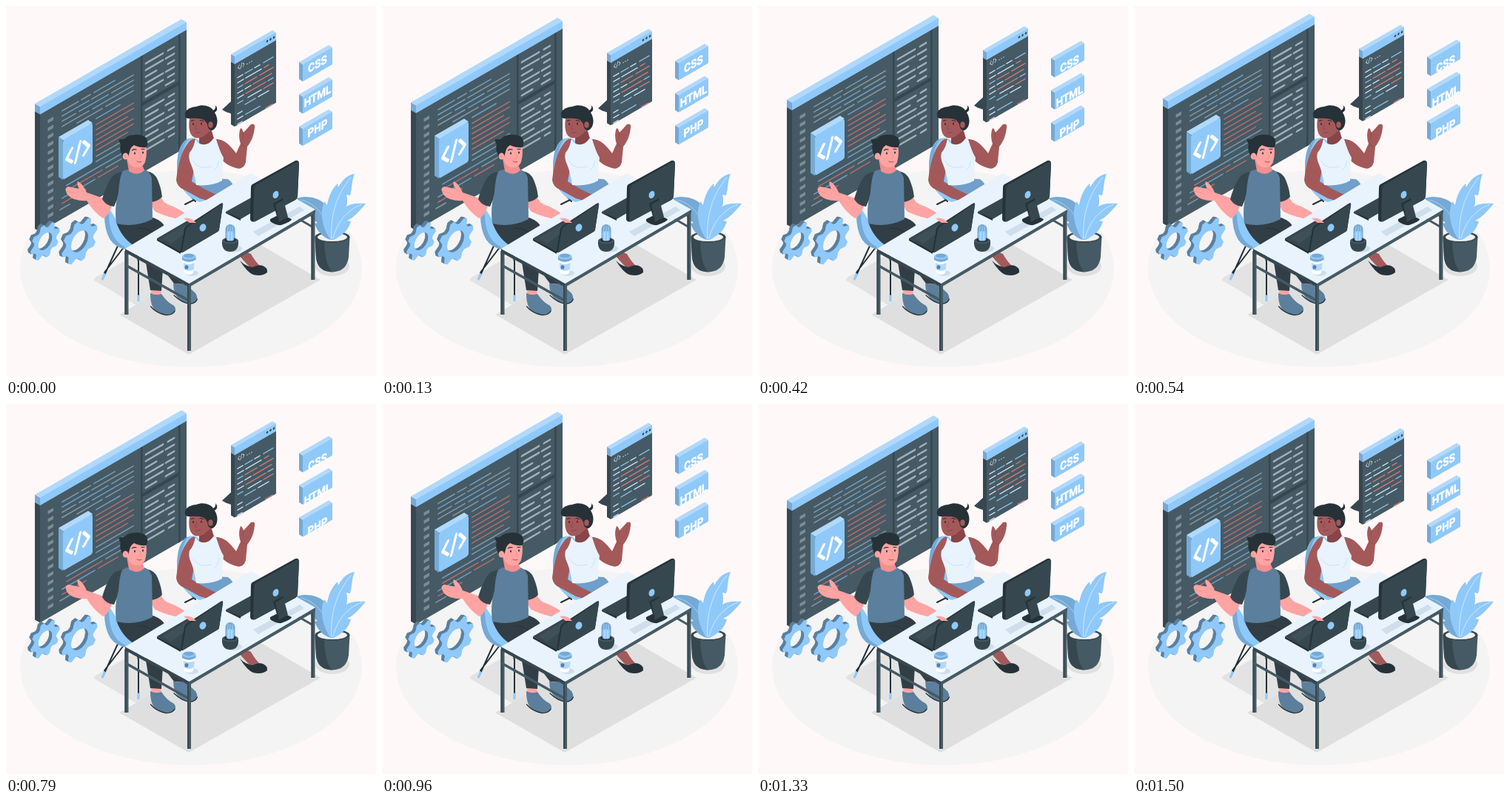
Recreate the animation shown at these times as an HTML page. Size 500 px wide and 500 px high, loop 1540 ms.

```html
<!DOCTYPE html>
<html lang="en">
<head>
<meta charset="utf-8">
<title>Developers at work</title>
<style>
html, body { margin: 0; width: 100%; height: 100%; overflow: hidden; background: #fff8f8; }
svg { display: block; width: 100%; height: 100%; }
text { font-family: Roboto, Arial, sans-serif; font-weight: 700; text-anchor: middle; fill: #fff; stroke: #fff; stroke-width: .5; stroke-linejoin: round; }
</style>
</head>
<body>
<svg id="stage" viewBox="0 0 500 500" xmlns="http://www.w3.org/2000/svg"></svg>
<script>
const BLUE = '#8fc9fa', LIGHT = '#b1d9fc', DEEP = '#76a9d4', STEEL = '#5b7f9c';
const SLATE = '#455a64', DARK = '#37474f', INK = '#263238';
const SKIN = '#ffa4a3', BLUSH = '#f28f8f', BROWN = '#a3595a', UMBER = '#874547';

const poly = (pts, fill) => `<polygon points="${pts}" fill="${fill}"/>`;
const path = (d, fill, more = '') => `<path d="${d}" fill="${fill}" ${more}/>`;
const line = (d, color, w = 1) =>
  `<path d="${d}" fill="none" stroke="${color}" stroke-width="${w}" stroke-linecap="round" stroke-linejoin="round"/>`;
const oval = (x, y, rx, ry, fill, more = '') =>
  `<ellipse cx="${x}" cy="${y}" rx="${rx}" ry="${ry}" fill="${fill}" ${more}/>`;
const rect = (x, y, w, h, fill, r = 0) =>
  `<rect x="${x}" y="${y}" width="${w}" height="${h}" rx="${r}" fill="${fill}"/>`;
// wall plane that rises to the right
const wall = (x, y, body, sx = 1) =>
  `<g transform="matrix(${sx} ${-0.577 * sx} 0 1 ${x} ${y})">${body}</g>`;
const bars = (rows, w) => rows.map(([v, a, b, c]) => line(`M${a} ${v}H${b}`, c, w)).join('');

// slab: front face at (x, y), width w, height h, depth (dx, dy)
function slab(x, y, w, h, dx, dy, front, side, top, r = 0) {
  const k = 0.577 * w;
  return poly([x, y, x - dx, y - dy, x - dx, y + h - dy, x, y + h], side) +
    poly([x, y, x - dx, y - dy, x + w - dx, y - dy - k, x + w, y - k, x + 3, y + 3], top) +
    wall(x, y, rect(0, 0, w, h, front, r));
}

function board() {
  const grey = '#8296a3', blue = '#7299bb', red = '#ad6d70', pale = '#a0afb9';
  const code = [
    [13, 30, 52, grey], [13, 56, 68, grey], [13, 73, 101, blue],
    [20, 30, 66, blue], [20, 70, 126, grey],
    [27, 30, 48, grey], [27, 53, 92, blue], [27, 97, 126, grey],
    [34, 30, 66, grey], [34, 71, 126, blue],
    [41, 50, 84, grey], [41, 89, 126, grey],
    [50, 76, 108, blue],
    ...[58, 65, 72, 79, 86, 93].map((v, i) => [v, 76, 126 - (i % 3 === 2 ? 8 : 0), red]),
    [101, 76, 126, grey], [108, 76, 112, blue],
    [117, 36, 110, blue], [124, 36, 84, red], [124, 89, 110, grey],
    [131, 30, 74, blue], [131, 79, 105, red], [138, 30, 62, red], [145, 27, 40, grey]
  ];
  const side = [];
  for (let i = 0; i < 6; i++) {
    const v = 14 + i * 9;
    side.push([v, 143, 166 - (i % 3 === 2 ? 9 : 0), pale], [v, 173 - (i % 2) * 3, 181, pale]);
  }
  for (let i = 0; i < 7; i++) {
    const v = 77 + i * 9;
    side.push([v, 143, 167 - (i % 3 === 1 ? 8 : 0), pale], [v, 174 - (i % 2) * 4, 181, pale]);
  }
  let nums = '';
  for (let i = 0; i < 13; i++) nums += rect(10.5, 14 + i * 10.7, 7.5, 4.6, '#7a8c95');
  return poly([39, 142, 46, 146, 46, 305, 39, 301], DARK) +
    wall(46, 146, rect(0, 0, 198, 159, SLATE) +
      rect(136, 0, 2.5, 159, DARK) + rect(136, 64, 52, 5, DARK) + rect(187, 0, 2.5, 159, DARK) +
      nums + bars(code, 1.8) + bars(side, 2.8)) +
    slab(46, 136, 198, 10.5, 7, 4, BLUE, DEEP, LIGHT, 1) +
    slab(77, 181, 40, 54, 6, 4, BLUE, DEEP, LIGHT, 3) +
    wall(97, 207, line('M-8 -19L-15 -9L-8 -1M8 -19L15 -9L8 -1', '#fff', 4) +
      line('M3.5 -22L-3.5 3', '#fff', 3.4));
}

function popup() {
  const ice = '#cfe6f8', red = '#d97b7a', blue = '#8fc0e8';
  const rows = [
    [21, 4, 11, ice], [21, 14, 24, blue], [21, 27, 34, ice], [21, 39, 52, blue],
    [28, 4, 12, ice], [28, 15, 36, ice], [28, 40, 46, red],
    [35, 4, 11, blue], [35, 14, 30, red], [35, 34, 52, red],
    [42, 4, 11, ice], [42, 14, 22, ice], [42, 25, 50, red],
    [49, 4, 12, ice], [49, 15, 42, red], [49, 45, 52, blue],
    [56, 4, 11, blue], [56, 18, 36, ice], [56, 39, 52, red],
    [63, 14, 28, blue], [63, 32, 46, ice],
    [70, 4, 10, ice], [77, 4, 11, ice], [77, 15, 34, blue], [84, 4, 10, ice], [84, 42, 51, red]
  ];
  return poly([305, 128, 292, 140, 297, 143, 309, 147], DARK) +
    poly([304, 75, 309, 78, 309, 163, 304, 160], DARK) +
    wall(309, 78, rect(0, 0, 56, 85, SLATE, 1) + bars(rows, 1.5) +
      line('M6.500 5.500L4.500 8L6.500 10.500M11 5.500L13 8L11 10.500M9.800 4.500L7.800 11.500', ice, 0.8) +
      [17, 20, 23].map(x => oval(x, 10, 0.7, 0.7, ice)).join('')) +
    slab(309, 68, 56, 10.5, 5, 3, BLUE, DEEP, LIGHT, 1) +
    wall(309, 68, [44, 48.5, 53].map(x => oval(x, 5, 1.3, 1.5, DARK)).join(''));
}

function gear(x, y, r) {
  let d = '';
  for (let i = 0; i < 32; i++) {
    const a = (i + 2.5) * Math.PI / 16;
    const q = i % 4 < 2 ? r : r * 0.78;
    d += `${i ? 'L' : 'M'}${(q * Math.cos(a)).toFixed(2)} ${(q * Math.sin(a)).toFixed(2)}`;
  }
  const h = r * 0.5;
  d += `ZM${h} 0A${h} ${h} 0 1 0 ${-h} 0A${h} ${h} 0 1 0 ${h} 0Z`;
  let out = '';
  for (let i = 4; i >= 0; i--)
    out += `<g transform="matrix(.866 -.5 0 1 ${x - i} ${y - i * 0.58})">` +
      path(d, i ? STEEL : BLUE, `fill-rule="evenodd" stroke="${i ? STEEL : BLUE}" stroke-linejoin="round"`) + '</g>';
  return out;
}

function ground() {
  return oval(250, 355, 231, 133, '#f4f4f4') +
    path('M119 371Q119 367 126 364L180 333L250 375L190 405Q180 407 172 402Z', '#e3e3e3') +
    poly([153, 417, 247, 471, 425, 370, 331, 315], '#dfdfdf') +
    oval(441, 352, 23, 13, '#e0e0e0');
}

function plant() {
  return path('M417.500 312L419 340Q421 359 441 359.500Q460 359 463 340L464.500 312Z', SLATE) +
    path('M417.500 312L419 340Q421 359 441 359.500Q431 350 430 318Z', DARK) +
    oval(441, 312, 23.5, 7.5, DARK) + oval(441, 312.5, 20, 5.5, '#eef0f1') +
    path('M438 316C424 310 420 302 417 294L421 293C413 287 407 281 406 274C400 270 396 265 393 260C405 256 421 258 430 267C440 278 443 298 442 316Z', DEEP) +
    line('M399 262C420 267 434 286 440 314', LIGHT, 0.8) +
    path('M443 316C458 308 464 300 466 291L461 290C470 286 478 277 486 267C474 266 464 267 459 272L460 266C446 276 440 296 440 316Z', BLUE) +
    path('M438 316C426 296 424 278 430 264L434 269C436 257 440 248 448 240L449 245C455 234 462 228 471 227C467 236 468 246 465 256L460 255C463 266 460 275 453 283L449 281C451 294 446 306 442 316Z', BLUE) +
    line('M466 232C447 254 438 283 440 314M481 268C459 276 447 294 442 314', '#d4eafd', 0.9);
}

function woman() {
  return line('M262 258L242 268M247 254L256 264', INK, 2) +
    path('M232 232C230 208 232 190 243 181C250 176 259 178 262 184L266 240L300 240L292 256L262 265Q240 258 232 232Z', BLUE) +
    path('M232 232C230 208 232 190 243 181L247 179C237 190 235 210 237 240Z', DEEP) +
    path('M257 240Q280 232 300 234Q309 240 308 250L282 266L262 256Z', '#6f9fca') +
    path('M280 180C293 178 302 187 311 199L317 186C315 180 314 172 317 165Q319 165 321 171L331 160Q337 158 336 164C335 176 331 184 326 190L324 211Q321 222 311 219C302 217 294 211 287 204Z', BROWN) +
    line('M321 171L320 178M318 186L324 190', UMBER, 0.7) +
    path('M261 170L277 166L282 182Q274 192 261 188Z', UMBER) +
    path('M257 180Q252 178 247 184C237 196 233 212 230 235Q231 244 240 248L262 260Q275 265 287 261Q290 257 280 253Q266 247 251 237L256 210Z', BROWN) +
    path('M256 179C260 190 274 190 280 179L284 180Q289 197 294 205Q292 220 292 236Q278 244 257 242Q255 226 250 214Q246 206 248 198Q254 192 256 179Z', '#e8f3fe') +
    line('M253 210Q262 222 277 217M288 208Q287 218 282 221', '#c6dff4', 0.9) +
    path('M249 148C246 160 247 171 252 176Q258 181 267 176L277 168L282 148Q266 138 249 148Z', BROWN) +
    path('M243 151C239 143 246 137 257 136C267 132 277 136 280 141Q284 139 283 134Q288 140 282 144C288 153 286 165 279 168C275 168 273 166 272 160C270 154 265 152 259 152C252 151 247 153 243 151Z', INK) +
    oval(276.5, 160.5, 3.2, 4.2, BROWN) +
    oval(253, 159.5, 1, 1.5, INK) + oval(264, 159, 1, 1.5, INK) +
    line('M250 155.5L254 154.5M262 154.5L267 155.5', INK, 1) +
    line('M257.5 160L255.5 166L258 167', UMBER, 0.8) + line('M256 171Q259 172.500 263 170', UMBER, 1);
}

function womanLeg() {
  return path('M320 330L331 335Q337 346 345 353L335 358Q326 350 316 338Z', BROWN) +
    path('M316 344Q324 352 333 353Q341 349 347 351Q354 354 353 360Q346 366 334 363Q326 360 316 344Z', INK);
}

const TROUSERS = '#313e45';

function manLegs() {
  return path('M195 378L210 378L209 394L197 394Z', SKIN) + path('M228 372L242 372L242 382L228 382Z', SKIN) +
    path('M188 340L213 340L210 385L195 384Z', TROUSERS) +
    path('M208 350L242 360L243 376L227 375Z', TROUSERS) +
    path('M195 388Q203 392 210 389Q217 400 227 405Q231 410 227 415Q216 420 204 413Q195 408 195 388Z', STEEL) +
    line('M195.5 406Q203 415 216 417.5Q225 418 228 412', INK, 1.3) +
    path('M226 374Q234 378 242 374Q249 382 256 388Q260 394 257 400Q248 405 236 398Q226 391 226 374Z', STEEL) +
    line('M227 391Q237 401 249 402.5Q256 402 258.5 396', INK, 1.3);
}

function man() {
  return line('M152 322L131 368M174 326L179 345V396M160 325L133 360', INK, 2) +
    line('M133 363L130.5 369M179 392V398', BLUE, 3.2) +
    path('M136 268C131 282 133 303 141 316Q148 326 162 329L196 316L150 290Z', BLUE) +
    path('M136 268C131 282 133 303 141 316Q148 326 162 329L160 325C144 318 138 298 139 272Z', DEEP) +
    path('M149 292L199 286Q212 291 215 299L211 320L176 326Q156 314 149 292Z', TROUSERS) +
    line('M178 300Q188 299 199 306', INK, 1) +
    path('M132 260L109 252Q104 240 97 237Q95 240 99 247L84 244Q79 246 81 250Q82 257 92 261Q102 264 109 263Q118 278 131 287Q139 284 144 267Z', SKIN) +
    line('M99 247L105 251M82 250L91 253', BLUSH, 0.8) +
    path('M159 224Q147 224 141 234Q134 246 130 261Q135 270 146 271L157 246Z', DARK) +
    path('M195 260L209 257Q212 266 221 269Q234 274 243 281Q253 286 257 293Q251 295 243 290Q219 286 202 278Q196 272 195 260Z', SKIN) +
    path('M190 223Q201 225 205 235Q210 247 211 258Q204 265 195 265L191 240Z', DARK) +
    path('M157 224Q164 219 168 222L187 221Q194 223 197 232L198 288Q174 300 149 294Q146 272 152 252Q153 234 157 224Z', STEEL) +
    path('M163 206L183 212L187 222Q178 231 166 223Z', BLUSH) +
    path('M163 188C162 207 165 215 174 218Q184 220 188 211C190 202 191 194 188 186Q174 178 163 188Z', SKIN) +
    path('M160 206C155 200 153 192 155 187Q152 183 153 180Q159 181 163 177C170 173 184 172 190 179Q193 187 189 191Q182 192 173 188Q168 191 167 197L165 204Z', INK) +
    oval(161.5, 203, 3.8, 4.6, SKIN) + line('M159.500 201Q162 202 162 205', BLUSH, 0.8) +
    oval(174, 199, 1, 1.5, INK) + oval(185, 198, 1, 1.5, INK) +
    line('M170.5 195Q173 193 176 194M183 193.5L187 193.5', INK, 1.2) +
    line('M180.5 198L183 205L180 206', BLUSH, 0.9) + line('M177 210Q180 212 183 210.500', '#b9484d', 1);
}

function desk() {
  const leg = (x, y, h) => rect(x - 2.5, y, 5, h, SLATE) + rect(x - 2.5, y, 2, h, DARK);
  return line('M332 251L415 299', SLATE, 3) + leg(163, 331, 86) + leg(415, 279, 91) +
    line('M163 351L247 398', SLATE, 3.5) + leg(247.5, 375, 91) +
    poly([161, 328, 247.5, 375, 247.5, 380, 161, 333], DARK) +
    poly([247.5, 375, 418, 275, 418, 280, 247.5, 380], SLATE) +
    poly([161, 328, 331, 226, 418, 275, 247.5, 375], '#e8f3fe');
}

function deskItems() {
  const cactus = [-3, 0, 3].map(x => line(`M${303 + x} 298Q${303 + x * 1.5} 308 ${303 + x} 317`, LIGHT, 0.8)).join('');
  return poly([334, 305, 397, 271, 403, 276, 341, 311], '#cfdeeb') +
    poly([297, 278, 333, 258, 348, 270, 317, 288], DARK) + poly([297, 278, 317, 287, 317, 290, 297, 280], INK) +
    path('M357 288L371 281L386 288Q386 291 372 296Q365 297 357 291Z', INK) +
    path('M333 241L391 209Q396 208 396 213L394 257Q394 260 391 262L337 291Q331 293 330 288L331 245Q331 242 333 241Z', INK) +
    path('M337 242L392 211Q396 209 396 213L394 257Q394 260 391 262L337 291Q334 292 334 288L335 246Q335 243 337 242Z', DARK) +
    poly([361, 267, 374, 260, 379, 284, 368, 291], INK) + poly([364, 268, 375, 262, 381, 285, 369, 292], DARK) +
    oval(364.5, 255, 3.8, 5.2, BLUE, 'transform="rotate(20 364.5 255)"') +
    // laptop
    poly([204, 314, 247, 289, 262, 300, 236, 333], DARK) + poly([204, 314, 236, 332, 236, 335, 204, 317], INK) +
    poly([211, 314, 243, 295, 250, 300, 224, 321], '#3f5059') +
    path('M244 297L290 267Q294 265 293 269L288 302Q288 304 286 305L238 333Q235 334 236 331L241 301Q242 298 244 297Z', INK) +
    path('M246 298L290 268.500Q294 266 293 270L288 302Q288 304 286 305L239 333Q237 334 238 331L243 302Q244 299 246 298Z', DARK) +
    oval(266, 299.5, 4.3, 5.3, BLUE, 'transform="rotate(25 266 299.5)"') +
    path('M240 287Q250 285 257 293L248 293Z', SKIN) +
    // cactus
    oval(307, 328, 12, 5, '#cfdeeb') +
    rect(296.5, 295, 13, 25, DEEP, 6.5) + cactus +
    path('M292 317Q291 332 303 332Q315 332 314 317Z', DARK) + oval(303, 317, 11, 4.3, SLATE) + oval(303, 316.5, 8, 2.7, INK) +
    rect(298, 304, 10, 13.5, BLUE, 3) + line('M301 306V316M305 306V316', '#e8f3fe', 0.8) +
    // cup
    oval(251, 361, 9, 4, '#cfdeeb') +
    path('M239 342L241 361Q247 365 253 361L255.5 342Z', '#fff') +
    path('M239.7 347L240.7 356Q247 360 253.7 356L254.8 347Q247 351 239.7 347Z', LIGHT) +
    oval(244, 353, 2.5, 2.8, STEEL) +
    path('M238 339V343Q247 349 256.5 343V339Z', DEEP) + oval(247.2, 338.5, 9.3, 4, BLUE) + oval(247.2, 337.5, 7, 2.7, DEEP);
}

const labels = ['CSS', 'HTML', 'PHP'];
const boxes = labels.map((_, i) => slab(401, 79 + i * 43.5, 40, 23, 5, 3.2, BLUE, DEEP, LIGHT, 1)).join('');
const words = labels.map((s, i) => wall(421, 83.5 + i * 43.5, `<text font-size="15.5">${s}</text>`, 0.866)).join('');

document.getElementById('stage').innerHTML =
  rect(0, 0, 500, 500, '#fff8f8') + ground() +
  `<g id="float">${board()}${popup()}${boxes}</g>` + words +
  gear(53, 318, 22.5) + gear(99.5, 318, 27.5) + plant() +
  woman() + womanLeg() + man() + manLegs() + desk() + deskItems();

const floating = document.getElementById('float');
const LOOP = 1540, STEP = 1000 / 24, STEPS = 36, RISE = 10;

// linear rise and fall, stepped at 24 per second
function draw(t) {
  const k = Math.min(STEPS, Math.floor((t % LOOP + 3.4) / STEP));
  const y = -RISE * (1 - Math.abs(2 * k / STEPS - 1));
  floating.setAttribute('transform', `translate(0 ${y.toFixed(3)})`);
}

const start = performance.now();
function tick() {
  draw(performance.now() - start);
  requestAnimationFrame(tick);
}
draw(0);
requestAnimationFrame(tick);
</script>
</body>
</html>
```
